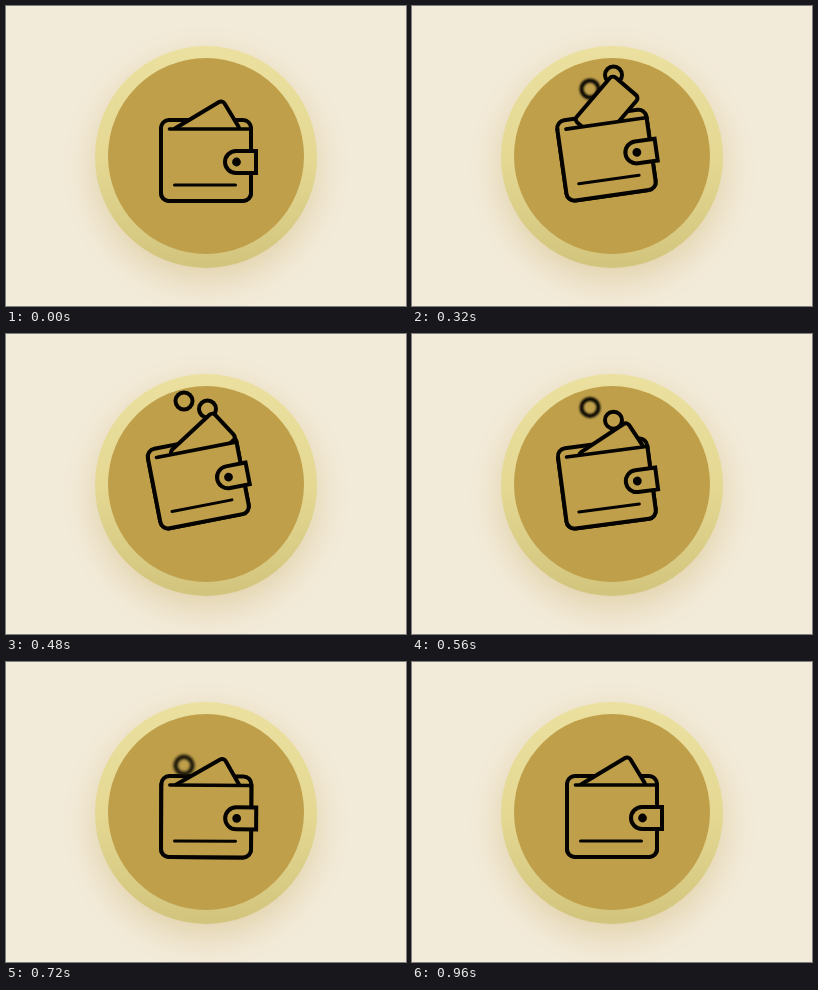
An HTML page with a canvas that plays this animation: 400 by 300 pixels, repeating every 1 s.

```html
<!DOCTYPE html>
<html lang="en">
<head>
<meta charset="utf-8">
<title>Wallet</title>
<style>
  html, body { margin: 0; width: 100%; height: 100%; overflow: hidden; background: #f3ebda; }
  canvas { display: block; width: 400px; height: 300px; }
</style>
</head>
<body>
<canvas id="stage" width="400" height="300"></canvas>
<script>
const ctx = document.getElementById('stage').getContext('2d');
const GOLD = '#bf9f4a', INK = '#050400';
const LOOP = 1000, TICK = 40, KEY_GAP = 160;

// One value per 160 ms, from rest back to rest
const tilt = [0, -4.4, -8.1, -11, -3, 2.3, 0];
const coinA = [134, 112, 83, 67, 86, 120, 134];
const coinB = [134, 108, 69, 75, 100, 128, 134];
const cardX = [216.5, 208.5, 200.5, 206.5, 221.5, 212.5, 216.5];
const cardY = [94, 82, 69, 78, 96, 93, 94];
const cardTilt = [-31, -39.5, -49.5, -43, -26, -35, -31];

// Smooth curve through the keys
function at(keys, t) {
  const u = Math.max(0, Math.min(t / KEY_GAP, keys.length - 1));
  const i = Math.min(Math.floor(u), keys.length - 2), f = u - i;
  const b = keys[i], c = keys[i + 1];
  const a = keys[i - 1] ?? b, d = keys[i + 2] ?? c;
  const m = i ? (c - a) / 2 : 0;
  const n = i < keys.length - 2 ? (d - b) / 2 : 0;
  return b + f * (m + f * (3 * (c - b) - 2 * m - n + f * (2 * (b - c) + m + n)));
}

const speed = (keys, t) => Math.abs(at(keys, t + 10) - at(keys, t - 10)) / 20;
const rad = deg => deg * Math.PI / 180;

function blur(px) {
  ctx.filter = px > 0.15 ? `blur(${px.toFixed(2)}px)` : 'none';
}

function disc(x, y, r, fill) {
  ctx.beginPath();
  ctx.arc(x, y, r, 0, 2 * Math.PI);
  ctx.fillStyle = fill;
  ctx.fill();
}

function outline(width = 4) {
  ctx.lineWidth = width;
  ctx.stroke();
}

function line(x1, x2, y, width) {
  ctx.beginPath();
  ctx.moveTo(x1, y);
  ctx.lineTo(x2, y);
  outline(width);
}

function badge() {
  ctx.fillStyle = '#f3ebda';
  ctx.fillRect(0, 0, 400, 300);
  const rim = ctx.createLinearGradient(0, 40, 0, 262);
  rim.addColorStop(0, '#ece0a0');
  rim.addColorStop(0.5, '#e4d893');
  rim.addColorStop(1, '#d2c47c');
  ctx.save();
  ctx.shadowColor = 'rgba(191,160,74,0.35)';
  ctx.shadowBlur = 36;
  ctx.shadowOffsetY = 12;
  disc(200, 151, 111, rim);
  ctx.restore();
  disc(200, 150, 98, GOLD);
}

function onWallet(t, draw) {
  ctx.save();
  ctx.translate(159.5, 191);
  ctx.rotate(rad(at(tilt, t)));
  ctx.translate(-159.5, -191);
  draw();
  ctx.restore();
}

function walletBack() {
  ctx.beginPath();
  ctx.roundRect(155, 114, 90, 81, 8);
  outline();
}

function walletFront() {
  ctx.fillStyle = GOLD;
  ctx.beginPath();
  ctx.roundRect(155, 123, 90, 72, [0, 0, 8, 8]);
  ctx.fill();
  // Redraw the sides and base over whatever sits inside
  ctx.beginPath();
  ctx.moveTo(155, 122);
  ctx.arcTo(155, 195, 163, 195, 8);
  ctx.arcTo(245, 195, 245, 187, 8);
  ctx.lineTo(245, 122);
  outline();
  line(163.5, 244, 123, 3.6);
  line(168.5, 229.5, 179, 3);

  ctx.beginPath();
  ctx.moveTo(250, 145);
  ctx.lineTo(230, 145);
  ctx.arc(230, 156, 11, -Math.PI / 2, Math.PI / 2, true);
  ctx.lineTo(250, 167);
  ctx.closePath();
  ctx.fill();
  ctx.lineJoin = 'miter';
  outline();
  disc(230.5, 156, 4.4, INK);
}

function coin(x, keys, t, softness) {
  blur(speed(keys, t) * softness);
  disc(x, at(keys, t), 8.5, GOLD);
  outline();
  blur(0);
}

function card(t) {
  ctx.save();
  blur(speed(cardY, t) * 5);
  ctx.translate(at(cardX, t), at(cardY, t));
  ctx.rotate(rad(at(cardTilt, t)));
  ctx.beginPath();
  ctx.roundRect(-59, 0, 59, 35, 4);
  ctx.fillStyle = GOLD;
  ctx.fill();
  outline();
  ctx.restore();
}

function frame(now) {
  const t = Math.floor(now % LOOP / TICK) * TICK;
  ctx.strokeStyle = INK;
  ctx.lineCap = 'round';
  badge();
  onWallet(t, walletBack);
  coin(178, coinA, t, 7);
  coin(201.5, coinB, t, 3);
  card(t);
  onWallet(t, walletFront);
  requestAnimationFrame(frame);
}
requestAnimationFrame(frame);
</script>
</body>
</html>
```
